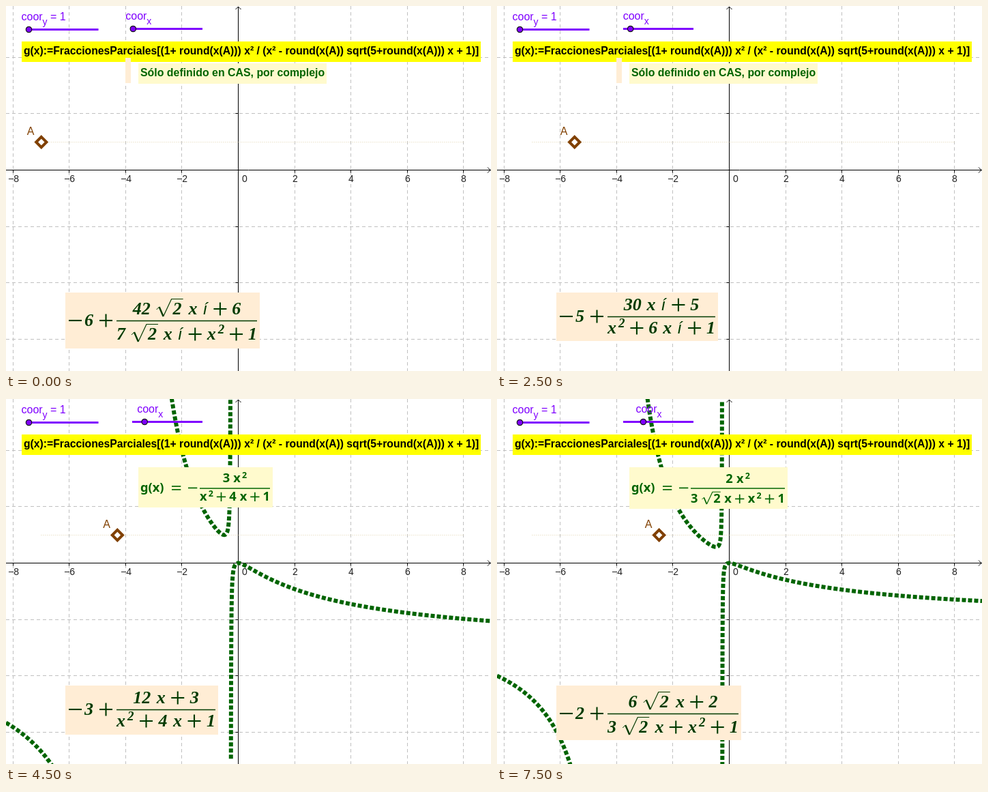
Animation, 711 px wide and 535 px high, one loop 8 s. Source, as an HTML page with a canvas:

```html
<!DOCTYPE html>
<html lang="es">
<head>
<meta charset="utf-8">
<style>
html, body { margin: 0; width: 100%; height: 100%; overflow: hidden; background: #fff; }
canvas { display: block; }
</style>
</head>
<body>
<canvas id="stage" width="711" height="535"></canvas>
<script>
const W = 711, H = 535, X0 = 340.5, Y0 = 240.5, UNIT = 41.3;
const STEP = 500, STEPS = 16;
const ctx = document.getElementById('stage').getContext('2d');
const SANS = '"Liberation Sans", Arial, sans-serif';
const VIOLET = '#7f00ff', GREEN = '#006400', BROWN = '#804000';
const CREAM = '#fffacd', PEACH = '#ffedd5';

// Typesetting styles for the two formulas; s scales operators and radicals
const BIG = {
  s: 1, color: '#003a00', size: 26, sup: 19,
  font: size => `italic bold ${size}px "Liberation Serif", Times, serif`
};
const SMALL = {
  s: 0.7, color: GREEN, size: 18.3, sup: 12.5,
  font: size => `600 ${size}px "Noto Sans", "Open Sans", sans-serif`
};

// Partial fractions by rounded abscissa of A
const CASES = {
  '-7': { num: '42 √2 x í + 6', den: '7 √2 x í + x² + 1', right: 368, bottom: 502 },
  '-6': { num: '30 x í + 5', den: 'x² + 6 x í + 1', right: 320, bottom: 491 },
  '-5': { num: '4', den: 'x² + 1', right: 238, bottom: 490, b: 0, gRight: 337 },
  '-4': { num: '12 x + 3', den: 'x² + 4 x + 1', right: 307, bottom: 492, b: 4, gRight: 387 },
  '-3': { num: '6 √2 x + 2', den: '3 √2 x + x² + 1', right: 354, bottom: 500, b: 3 * Math.SQRT2, gRight: 422 }
};

const px = x => X0 + x * UNIT;
const py = y => Y0 - y * UNIT;
const snap = v => Math.floor(v) + 0.5;

function box(x, y, right, bottom, color) {
  ctx.fillStyle = color;
  ctx.fillRect(x, y, right - x, bottom - y);
}

function line(points, color, width = 1, dash = []) {
  ctx.strokeStyle = color;
  ctx.lineWidth = width;
  ctx.setLineDash(dash);
  ctx.beginPath();
  points.forEach(([x, y]) => ctx.lineTo(x, y));
  ctx.stroke();
  ctx.setLineDash([]);
}

function text(str, x, y, font, color, align = 'left') {
  ctx.font = font;
  ctx.fillStyle = color;
  ctx.textAlign = align;
  ctx.fillText(str, x, y);
}

function measure(str, font) {
  ctx.font = font;
  return ctx.measureText(str).width;
}

function drawGrid() {
  for (let n = -8; n <= 8; n += 2) {
    if (!n) continue;
    const x = snap(px(n)), y = snap(py(n));
    line([[x, 0], [x, H]], '#c0c0c0', 1, [5, 4]);
    line([[0, y], [W, y]], '#c0c0c0', 1, [5, 4]);
  }
}

function drawAxes() {
  line([[0, Y0], [W, Y0]], '#000');
  line([[X0, 1], [X0, H]], '#000');
  line([[W - 5, Y0 - 4], [W - 1, Y0], [W - 5, Y0 + 4]], '#000');
  line([[X0 - 4, 5], [X0, 1], [X0 + 4, 5]], '#000');
  const font = `14px ${SANS}`;
  for (let n = -8; n <= 8; n += 2) {
    if (!n) continue;
    const x = snap(px(n)), y = snap(py(n));
    line([[x, Y0], [x, Y0 + 4]], '#000');
    line([[X0 - 4, y], [X0, y]], '#000');
    text(String(n).replace('-', '−'), x + 0.5, 258, font, '#222', 'center');
  }
  text('0', 346, 258, font, '#222');
}

// g(x) = (k+1)x² / (x² + bx + 1), split at its poles and just outside the view
function drawCurve(k, b) {
  const MARGIN = 10;
  let piece = [];
  const flush = () => {
    if (piece.length > 1) line(piece, GREEN, 6, [6, 3]);
    piece = [];
  };
  for (let sx = 0; sx <= W; sx += 0.02) {
    const x = (sx - X0) / UNIT;
    const sy = py((k + 1) * x * x / (x * x + b * x + 1));
    if (sy >= -MARGIN && sy <= H + MARGIN) piece.push([sx, sy]);
    else flush();
  }
  flush();
}

function tokenWidth(token, st) {
  if ('+−='.includes(token)) return 19 * st.s;
  if (token === '√2') return 40 * st.s;
  if (token === 'í') return 8;
  if (token === 'x²') return measure('x', st.font(st.size)) + measure('2', st.font(st.sup)) + 3 * st.s;
  return measure(token, st.font(st.size));
}

function drawToken(token, x, y, st) {
  const { s, color } = st, font = st.font(st.size);
  const w = tokenWidth(token, st), mid = y - 8 * s;
  const bar = v => line([[x, v], [x + w, v]], color, 0.7 + 1.4 * s);
  if (token === '=') {
    bar(mid - 2.4);
    bar(mid + 2.4);
  } else if ('+−'.includes(token)) {
    bar(mid);
    if (token === '+') line([[x + w / 2, mid - w / 2], [x + w / 2, mid + w / 2]], color, 0.7 + 1.4 * s);
  } else if (token === '√2') {
    line([[x + s, y - 7 * s], [x + 5 * s, y - 11 * s]], color, 1);
    line([[x + 5 * s, y - 11 * s], [x + 11 * s, y + 3 * s]], color, 2.4 * s);
    line([[x + 11 * s, y + 3 * s], [x + 23 * s, y - 22.5 * s], [x + w, y - 22.5 * s]], color, 1.2);
    text('2', x + 25 * s, y, font, color);
  } else if (token === 'í') {
    text(token, x, y, `italic 24px ${SANS}`, color);
  } else if (token === 'x²') {
    text('x', x, y, font, color);
    text('2', x + measure('x', font) + 3 * s, y - 9 * s, st.font(st.sup), color);
  } else {
    text(token, x, y, font, color);
  }
}

// The denominator fills the bar; the numerator is centred with the same gaps
function drawFraction(num, den, left, right, barY, numY, denY, st) {
  const total = list => list.reduce((sum, t) => sum + tokenWidth(t, st), 0);
  const top = num.split(' '), low = den.split(' ');
  const gap = (right - left - total(low)) / (low.length - 1);
  const row = (list, x, y) => list.forEach(t => {
    drawToken(t, x, y, st);
    x += tokenWidth(t, st) + gap;
  });
  row(top, (left + right - total(top) - gap * (top.length - 1)) / 2, numY);
  row(low, left, denY);
  line([[left, barY], [right, barY]], st.color, 1.3);
}

function drawPartialFractions(k, c) {
  const shift = c.den.includes('√') ? 6 : 0, base = 463 + shift;
  box(87, 420, c.right + 4, c.bottom, PEACH);
  drawToken('−', 92, base, BIG);
  drawToken(String(-k - 1), 115, base, BIG);
  drawToken('+', 137, base, BIG);
  drawFraction(c.num, c.den, 162, c.right, 455.5 + shift, 446 + shift, 480 + 1.5 * shift, BIG);
}

function drawFunction(k, c) {
  const root = c.den.includes('√');
  box(194, 100, c.gRight + 4, root ? 161 : 159, CREAM);
  drawToken('g(x)', 197, 136, SMALL);
  drawToken('=', 243, 136, SMALL);
  drawToken('−', 267, 136, SMALL);
  drawFraction(`${-k - 1} x²`, c.den, 284, c.gRight, 131, root ? 123 : 122, root ? 152 : 149, SMALL);
}

function drawSlider(name, value, left, y, knob) {
  const x = knob - 11, font = `16px ${SANS}`;
  line([[left, y], [left + 103, y]], VIOLET, 3);
  ctx.beginPath();
  ctx.arc(knob, y, 4.2, 0, 2 * Math.PI);
  ctx.fillStyle = VIOLET;
  ctx.fill();
  ctx.strokeStyle = '#111';
  ctx.lineWidth = 1.2;
  ctx.stroke();
  text('coor', x, y - 13.5, font, VIOLET);
  text(name, x + 31, y - 7, `14px ${SANS}`, VIOLET);
  text(value, x + 38, y - 13.5, font, VIOLET);
}

function drawPoint(a) {
  const x = px(a) + 0.4, y = py(1) + 0.3, r = 7.6;
  ctx.strokeStyle = BROWN;
  ctx.lineWidth = 4;
  ctx.beginPath();
  [[0, -r], [r, 0], [0, r], [-r, 0]].forEach(([dx, dy]) => ctx.lineTo(x + dx, y + dy));
  ctx.closePath();
  ctx.fillStyle = '#fff';
  ctx.fill();
  ctx.stroke();
  text('A', x - 21, 189, `16px ${SANS}`, BROWN);
}

function draw(step) {
  const a = -7 + 0.3 * step;
  const k = -Math.floor(-a + 0.5 + 1e-9);
  const c = CASES[k], real = c.b !== undefined;
  box(0, 0, W, H, '#fff');
  drawGrid();
  drawAxes();
  line([[px(-7), 199.5], [px(8), 199.5]], '#e2d4ae', 1, [1, 2]);
  if (real) drawCurve(k, c.b);
  drawSlider('y', ' = 1', 32.5, 34.5, 33.5);
  drawSlider('x', '', 185, 33.5, 186.3 + 6.25 * (a + 7));
  box(23, 52, 696, 82, '#ff0');
  text('g(x):=FraccionesParciales[(1+ round(x(A))) x² / (x² - round(x(A)) sqrt(5+round(x(A))) x + 1)]',
    26, 71, `bold 15.72px ${SANS}`, '#000');
  if (real) {
    drawFunction(k, c);
  } else {
    box(175, 76, 183, 113, PEACH);
    box(194, 84, 470, 114, CREAM);
    text('Sólo definido en CAS, por complejo', 197, 103, `bold 15.9px ${SANS}`, GREEN);
  }
  drawPartialFractions(k, c);
  drawPoint(a);
}

const start = performance.now();
let shown = -1;
function tick() {
  const step = Math.floor((performance.now() - start) / STEP) % STEPS;
  if (step !== shown) draw(shown = step);
  requestAnimationFrame(tick);
}
tick();
</script>
</body>
</html>
```
